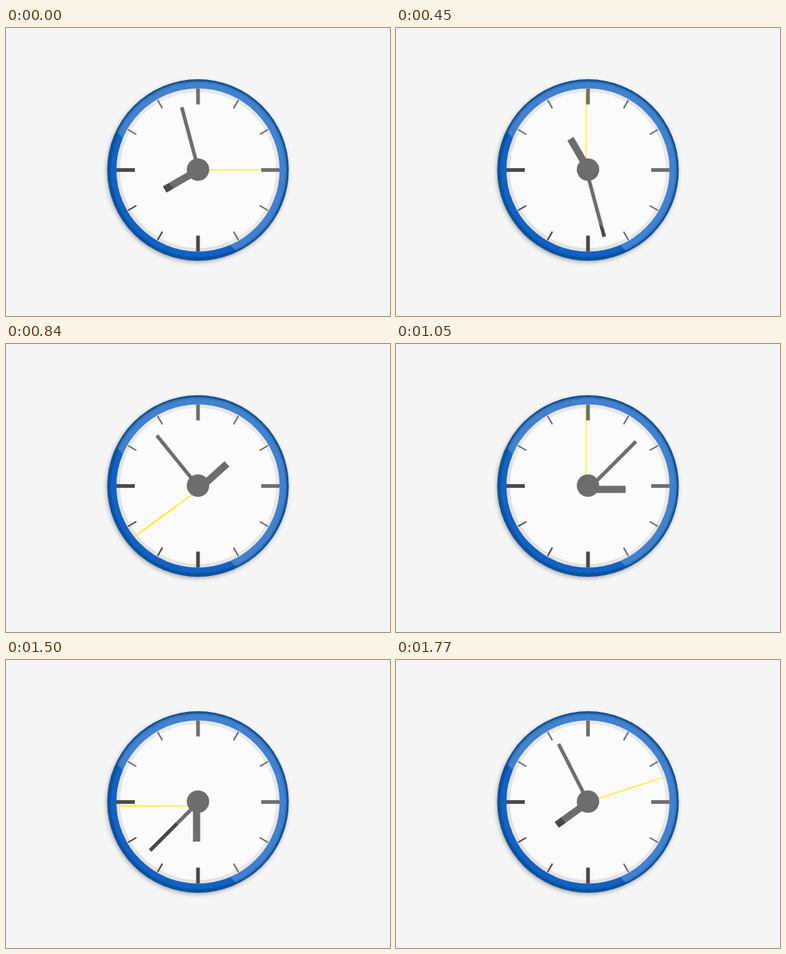
Recreate the animation shown at these times as an HTML page. Size 480x360 px, loop 1800 ms.

```html
<!DOCTYPE html>
<html lang="en">
<head>
<meta charset="utf-8">
<title>Clock</title>
<style>
  html, body { margin: 0; width: 100%; height: 100%; overflow: hidden; background: #f5f5f5; }
  svg { display: block; }
  .shadow { filter: drop-shadow(-.5px 2.5px 2.5px rgba(0, 0, 0, .3)); }
</style>
</head>
<body>
<svg width="480" height="360" viewBox="0 0 480 360">
  <circle class="shadow" cx="240" cy="177.5" r="113.5" fill="#0d529f"/>
  <circle cx="240" cy="177.5" r="109" fill="#1162c4"/>
  <circle cx="240" cy="177.5" r="102" fill="#e2e2e2"/>
  <circle cx="240" cy="177.5" r="97.5" fill="#fafafa"/>
  <path id="second" d="M237.5 180V81" stroke="#ffe81a" stroke-width="1.7"/>
  <g id="ticks" stroke="#484848"></g>
  <path id="hour" d="M241.8 180V133" stroke="#484848" stroke-width="9"/>
  <path id="minute" d="M241.3 180V96.6" stroke="#484848" stroke-width="4.5"/>
  <circle cx="240" cy="177" r="14" fill="#484848"/>
  <!-- glass highlight -->
  <path d="M139.4 130.4A111 111 0 1 1 287 278Z" fill="#fff" opacity=".2"/>
</svg>
<script>
  const STEP = 30, LOOP = 1800;
  const $ = id => document.getElementById(id);

  let ticks = '';
  for (let i = 0; i < 12; i++) {
    const major = i % 3 === 0;
    const inner = !major ? 89 : i % 6 ? 79 : 82;
    ticks += `<path d="M240 ${177.5 - inner}V${major ? 75.5 : 76.5}" stroke-width="${major ? 4.6 : 1.9}"
      transform="rotate(${i * 30} 240 177.5)"/>`;
  }
  $('ticks').innerHTML = ticks;

  const turn = (id, angle) => $(id).setAttribute('transform', `rotate(${angle} 240 180)`);
  const start = performance.now();

  function draw(now) {
    const n = Math.floor(Math.max(0, now - start) % LOOP / STEP);
    turn('hour', 240 + 6 * n);
    turn('minute', 345 + 12 * n);
    turn('second', 90 + 18 * n);
    requestAnimationFrame(draw);
  }
  draw(start);
</script>
</body>
</html>
```
